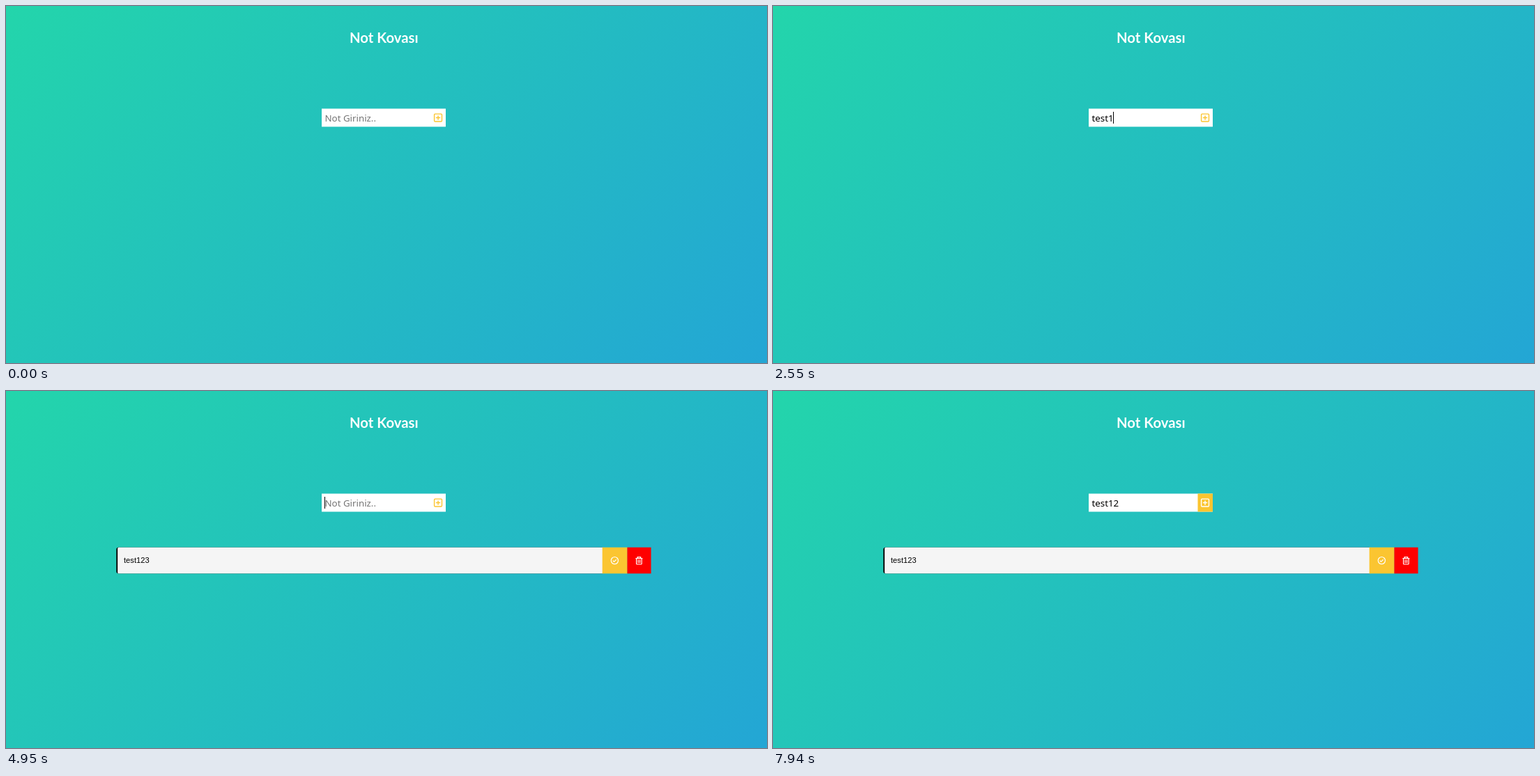
An HTML page with a canvas for the animation above (8000 ms loop, 1092x513 px).

```html
<!DOCTYPE html>
<html lang="tr">
<head>
<meta charset="utf-8">
<title>Not Kovası</title>
<style>
  html, body { margin: 0; width: 100%; height: 100%; overflow: hidden; }
  canvas { display: block; }
</style>
</head>
<body>
<canvas id="stage" width="1092" height="513"></canvas>
<script>
const ctx = document.getElementById('stage').getContext('2d');
const W = 1092, H = 513, LOOP = 8000;
const YELLOW = '#fbc531';
const INPUT_FONT = '13.3px "Noto Sans", "Open Sans", sans-serif';

// Each list holds [start time, value]; a value lasts until the next start.
const typed = [
  [0, ''], [1190, 't'], [1390, 'te'], [1660, 'tes'], [1930, 'test'],
  [2220, 'test1'], [2680, 'test12'], [3030, 'test123'], [3410, ''],
  [5350, 't'], [5480, 'te'], [5820, 'tes'], [6020, 'test'],
  [7080, 'test1'], [7550, 'test12']
];
const caret = [
  [0, false], [920, true], [1190, false], [1460, true], [2000, false],
  [2550, true], [3080, false], [4950, true], [5550, false],
  [6090, true], [6620, false], [7150, true], [7680, false]
];
const hover = [[0, false], [3080, true], [3940, false], [7940, true]];
const listed = [[0, false], [3410, true]];

function at(track, t) {
  let value = track[0][1];
  for (const [start, v] of track) if (t >= start) value = v;
  return value;
}

function box(x, y, w, h, color) {
  ctx.fillStyle = color;
  ctx.fillRect(x, y, w, h);
}

function text(str, x, y, font, color, align = 'left') {
  ctx.font = font;
  ctx.fillStyle = color;
  ctx.textAlign = align;
  ctx.fillText(str, x, y);
}

function stroke(color, width, build) {
  ctx.beginPath();
  build();
  ctx.strokeStyle = color;
  ctx.lineWidth = width;
  ctx.stroke();
}

function line(...points) {
  points.forEach(([x, y], i) => i ? ctx.lineTo(x, y) : ctx.moveTo(x, y));
}

function drawBackground() {
  // A 135 degree gradient whose ends touch the corners.
  const d = (W + H) / 4;
  const g = ctx.createLinearGradient(W / 2 - d, H / 2 - d, W / 2 + d, H / 2 + d);
  g.addColorStop(0, '#23d5ab');
  g.addColorStop(1, '#23a6d5');
  box(0, 0, W, H, g);
}

function drawAddButton(active) {
  if (active) box(609.5, 147.5, 21.5, 26, YELLOW);
  const color = active ? '#fff' : YELLOW;
  stroke(color, 1.4, () => {
    ctx.roundRect(614.6, 155.1, 10.9, 10.9, 1.2);
    line([620.05, 157.4], [620.05, 163.7]);
    line([616.9, 160.55], [623.2, 160.55]);
  });
}

function drawInput(t) {
  const value = at(typed, t), x = 457.5;
  box(453, 147.5, 178, 26, '#fff');
  text(value || 'Not Giriniz..', x, 166, INPUT_FONT, value ? '#000' : '#757575');
  if (at(caret, t)) {
    box(Math.floor(x + ctx.measureText(value).width), 152, 1, 17, '#000');
  }
  drawAddButton(at(hover, t));
}

function drawCheck(x, y) {
  stroke('#fff', 1.2, () => ctx.arc(x, y, 5.1, 0, Math.PI * 2));
  stroke('#fff', 1.2, () => line([x - 2.6, y + 0.1], [x - 0.9, y + 1.8], [x + 2.4, y - 1.5]));
}

function drawTrash(x, y) {
  stroke('#fff', 1.2, () => {
    line([x - 5, y - 3.1], [x + 5, y - 3.1]);
    line([x - 2.3, y - 3.1], [x - 2.3, y - 5], [x + 2.3, y - 5], [x + 2.3, y - 3.1]);
    ctx.roundRect(x - 3.8, y - 3.1, 7.6, 8.4, [0, 0, 1, 1]);
    line([x - 1.2, y - 1.3], [x - 1.2, y + 3.5]);
    line([x + 1.2, y - 1.3], [x + 1.2, y + 3.5]);
  });
}

function drawNote() {
  const y = 224.7, h = 37.6;
  for (const [x, color, r] of [[158.3, '#000', 3.2], [160.2, '#f5f5f5', 1.6]]) {
    ctx.beginPath();
    ctx.roundRect(x, y, 857 - x, h, [r, 0, 0, r]);
    ctx.fillStyle = color;
    ctx.fill();
  }
  text('test123', 169, 247, '11.2px "Liberation Sans", Arial, sans-serif', '#000');
  box(855.7, y, 36, h, YELLOW);
  box(891.5, y, 34.1, h, '#f00');
  drawCheck(873.4, 243.6);
  drawTrash(908.4, 243.7);
}

function draw(t) {
  drawBackground();
  text('Not Kovası', 542.3, 52.5, 'bold 20.3px Lato, sans-serif', '#fff', 'center');
  drawInput(t);
  if (at(listed, t)) drawNote();
}

const begin = performance.now();
function tick() {
  draw((performance.now() - begin) % LOOP);
  requestAnimationFrame(tick);
}
tick();
</script>
</body>
</html>
```
